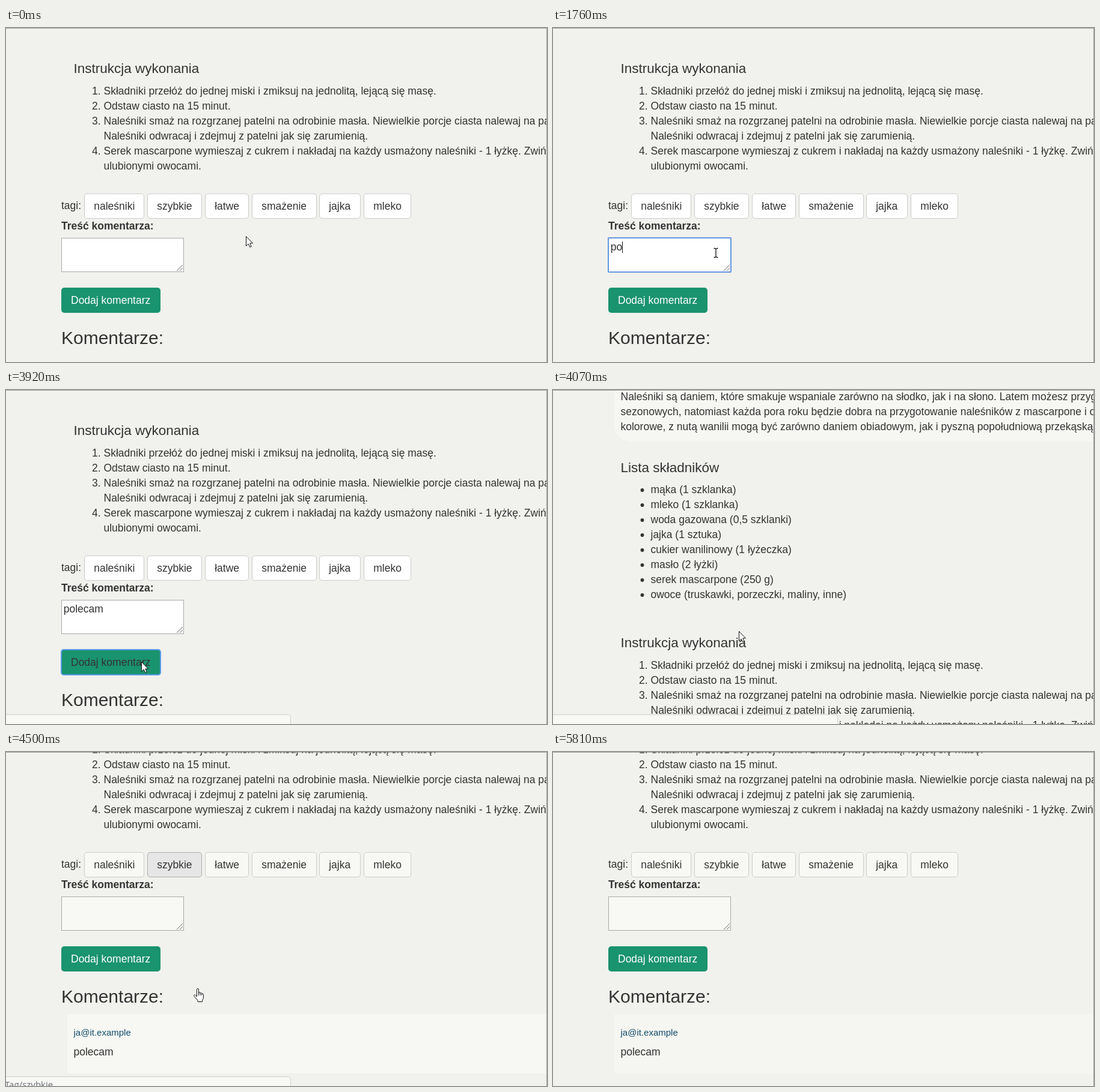
Write an HTML page that moves like this. It is 900 by 557 pixels and loops after 6220 ms.

```html
<!DOCTYPE html>
<html lang="pl">
<head>
<meta charset="utf-8">
<title>Dodawanie komentarza</title>
<style>
  html, body { margin: 0; width: 100%; height: 100%; overflow: hidden; background: #f1f1ed; }
  svg { display: block; width: 900px; height: 557px; }
  text { font: 17.5px "Liberation Sans", Arial, sans-serif; fill: #333; white-space: pre; }
  .h4 { font-size: 22.5px; }
  .h3 { font-size: 30px; }
  .bold { font-weight: bold; }
  .mail { font-size: 15px; fill: #114b6b; }
  .status { font: 15px "Open Sans", sans-serif; fill: #6b6f73; }
</style>
</head>
<body>
<svg id="stage" viewBox="0 0 900 557" xmlns="http://www.w3.org/2000/svg">
  <rect width="900" height="557" fill="#f1f1ed"/>
  <g id="page"></g>
  <g id="bubble">
    <path d="M-2 541.5H469.5Q473.5 541.5 473.5 545.5V560H-2Z" fill="#f8f9f5" stroke="#cfcfcc"/>
    <text id="status" class="status" x="-2" y="560"></text>
  </g>
  <path d="M0 .5H899.5V557" fill="none" stroke="#9c9c9c"/>
  <g id="cursors" stroke-linejoin="round">
    <path id="arrow" d="M.5 .5V16.5L4.2 13.1L6.8 18.5L9.2 17.4L6.8 12H11.5Z" fill="#fff" stroke="#111"/>
    <path id="beam" d="M-3.5-7.5H-1.5L0-6.5L1.5-7.5H3.5M0-6.5V6.5M-3.5 7.5H-1.5L0 6.5L1.5 7.5H3.5" fill="none" stroke="#111" stroke-width="1.3"/>
    <path id="hand" d="M5.5 14V2.2Q5.5 .5 7 .5T8.5 2.2V8Q8.8 6.6 10 6.7T11.2 8.4Q11.6 7.4 12.7 7.7T13.8 9.3Q14.2 8.5 15.2 8.8T16.4 10.4V15Q16.4 18 14.6 20V22.5H7V20.3L1 13.6Q.1 12 1.2 11.2T3.6 11.8Z M8.5 8V12M11.2 8.4V12M13.8 9.3V12" fill="#fff" stroke="#111"/>
  </g>
</svg>
<script>
const LOOP = 6220, EM = 17.5;
const $ = id => document.getElementById(id);
const page = $("page");

function add(tag, attrs, content) {
  const el = document.createElementNS("http://www.w3.org/2000/svg", tag);
  for (const k in attrs) el.setAttribute(k, attrs[k]);
  if (content) el.textContent = content;
  return page.appendChild(el);
}
const label = (x, y, s, cls = "") => add("text", { x, y, class: cls }, s);
const box = (x, y, width, height, rx, fill, stroke = "none") =>
  add("rect", { x, y, width, height, rx, fill, stroke });

// Introduction and ingredients, above the first view
box(102, -600, 1100, 332, 28, "#f6f7f2");
["Naleśniki są daniem, które smakuje wspaniale zarówno na słodko, jak i na słono. Latem możesz przygotować",
 "sezonowych, natomiast każda pora roku będzie dobra na przygotowanie naleśników z mascarpone i owocami",
 "kolorowe, z nutą wanilii mogą być zarówno daniem obiadowym, jak i pyszną popołudniową przekąską."]
  .forEach((s, i) => label(112.5, -337 + i * 25, s));

label(112.5, -217, "Lista składników", "h4");
["mąka (1 szklanka)", "mleko (1 szklanka)", "woda gazowana (0,5 szklanki)", "jajka (1 sztuka)",
 "cukier wanilinowy (1 łyżeczka)", "masło (2 łyżki)", "serek mascarpone (250 g)",
 "owoce (truskawki, porzeczki, maliny, inne)"].forEach((s, i) => {
  add("circle", { cx: 148.5, cy: -187 + i * 25, r: 2.9, fill: "#333" });
  label(162.5, -182 + i * 25, s);
});

// Instructions
label(112.5, 75, "Instrukcja wykonania", "h4");
[["1.", "Składniki przełóż do jednej miski i zmiksuj na jednolitą, lejącą się masę."],
 ["2.", "Odstaw ciasto na 15 minut."],
 ["3.", "Naleśniki smaż na rozgrzanej patelni na odrobinie masła. Niewielkie porcje ciasta nalewaj na patelnię."],
 ["", "Naleśniki odwracaj i zdejmuj z patelni jak się zarumienią."],
 ["4.", "Serek mascarpone wymieszaj z cukrem i nakładaj na każdy usmażony naleśniki - 1 łyżkę. Zwiń i podawaj"],
 ["", "ulubionymi owocami."]].forEach(([n, s], i) => {
  label(143, 111 + i * 25, n);
  label(162.5, 111 + i * 25, s);
});

// Tags
label(92, 302, "tagi:");
const tags = [["naleśniki", 130, 100], ["szybkie", 235, 91], ["łatwe", 331, 73],
  ["smażenie", 409, 108], ["jajka", 521, 69], ["mleko", 595, 79]].map(([s, x, w]) => {
  const b = box(x + .5, 276.5, w - 1, 41, 4.5, "#fff", "#ccc");
  label(x + 16.2, 303, s);
  return b;
});

// Comment form
label(92, 336, "Treść komentarza:", "bold");
const area = box(92.5, 350.5, 203, 56, 0, "#fff", "#a9a9a9");
const areaRing = add("rect", { x: 92, y: 350, width: 204, height: 57, rx: 1, fill: "none", stroke: "#6496de", "stroke-width": 2 });
add("path", { d: "M284 405L294 395M289 405L294 400", stroke: "#6a6a6a" });
const typed = label(95.75, 371, "");
const caret = add("rect", { y: 356, width: 1, height: 19, fill: "#111" });
box(92, 433, 165, 42, 5, "#1a936f");
const send = label(108, 460, "Dodaj komentarz");
const sendRing = add("rect", { x: 92, y: 433, width: 165, height: 42, rx: 4, fill: "none", stroke: "#5b9be6", "stroke-width": 2 });
label(92, 527, "Komentarze:", "h3");

// Added comment
const posted = [box(102, 546, 800, 99, 0, "#f7f8f3"),
  label(112.5, 582, "ja@it.example", "mail"), label(112.5, 615, "polecam")];

// Step tracks: [start time, value...]
const mouse = [[0, "arrow", 399, 347], [280, "arrow", 388, 350], [400, "arrow", 352, 359], [520, "arrow", 306, 366],
  [650, "arrow", 274, 369], [790, "beam", 271, 375], [3080, "beam", 266, 378], [3230, "arrow", 250, 422],
  [3350, "hand", 224, 448], [3500, "hand", 219, 460], [3650, "hand", 219, 453], [3920, "arrow", 225, 453],
  [4070, "arrow", 309, 402], [4220, "hand", 312, 394], [4650, "arrow", 317, 395], [4960, "arrow", 317, 393],
  [5240, "arrow", 317, 395], [5390, "arrow", 470, 450], [5540, "arrow", 750, 498], [5660, "arrow", 810, 529], [5810, ""]];
const scroll = [[0, 0], [4070, 354], [4370, 110], [4500, -109]];
const keys = [[0, 0], [1610, 1], [1760, 2], [1890, 3], [2030, 4], [2280, 5], [2430, 6], [3080, 7], [4070, 0]];
const caretOn = [[0, 0], [910, 1], [1300, 0], [1610, 1], [2960, 0], [3080, 1], [3650, 0]];
const bubbleAlpha = [[0, 0], [3920, 1], [4650, .6], [4960, 0]];
const widths = [0, .556, 1.112, 1.334, 1.89, 2.39, 2.946, 3.779];

const at = (track, t) => track.reduce((a, k) => t >= k[0] ? k : a);
const show = (el, on) => el.setAttribute("visibility", on ? "visible" : "hidden");
const within = (t, a, b) => t >= a && t < b;

function draw(t) {
  const reloaded = t >= 4070, white = reloaded ? "#f8f9f4" : "#fff";
  page.setAttribute("transform", `translate(0 ${at(scroll, t)[1]})`);

  const n = at(keys, t)[1];
  typed.textContent = "polecam".slice(0, n);
  caret.setAttribute("x", Math.round(95.75 + widths[n] * EM - .4));
  show(caret, at(caretOn, t)[1]);
  show(areaRing, within(t, 910, 3650));
  show(sendRing, within(t, 3650, 4070));
  send.style.fill = within(t, 3350, 4070) ? "#333" : "#fff";

  area.setAttribute("fill", white);
  tags.forEach((b, i) => {
    const hover = i === 1 && within(t, 4370, 4650);
    b.setAttribute("fill", hover ? "#e6e6e6" : white);
    b.setAttribute("stroke", hover ? "#adadad" : "#ccc");
  });
  posted.forEach(el => show(el, reloaded));
  posted[0].setAttribute("fill", t < 5540 ? "#f7f8f3" : "#f5f6f1");

  $("bubble").setAttribute("opacity", at(bubbleAlpha, t)[1]);
  $("status").textContent = t >= 4370 ? "Tag/szybkie" : "";

  const [, kind, x, y] = at(mouse, t);
  for (const c of $("cursors").children) show(c, c.id === kind);
  if (kind) $(kind).setAttribute("transform", `translate(${x} ${y})`);
}

const start = performance.now();
function tick() {
  draw((performance.now() - start) % LOOP);
  requestAnimationFrame(tick);
}
tick();
</script>
</body>
</html>
```
